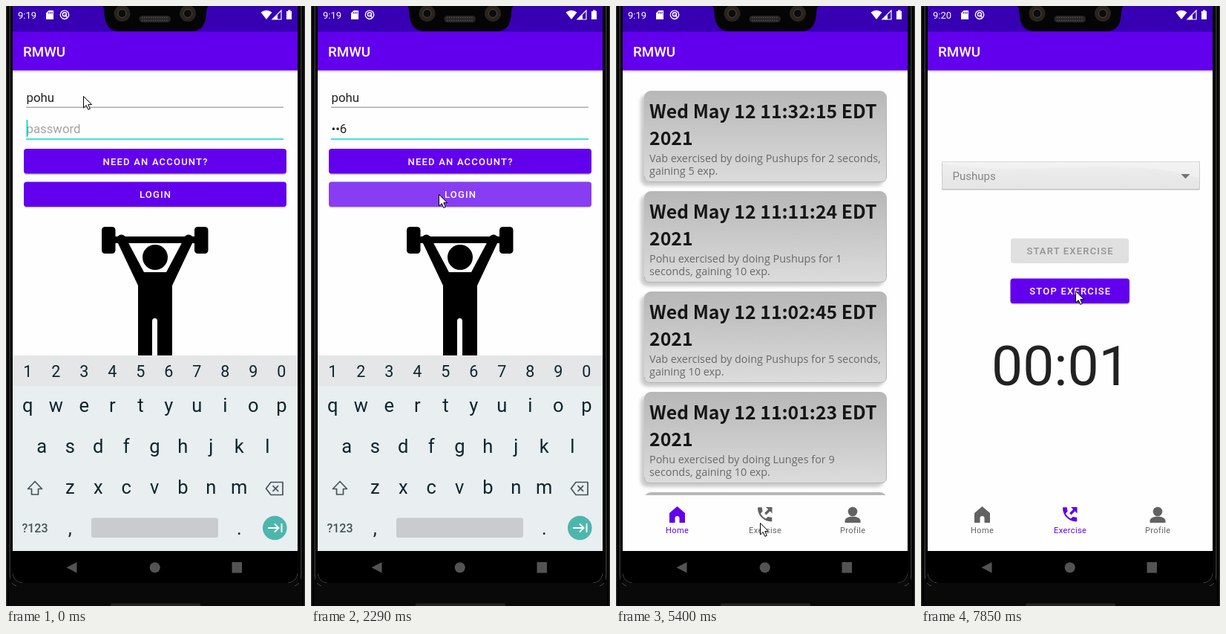
Recreate the animation shown at these times as an HTML page. Size 403x807 px, loop 8 s.

```html
<!DOCTYPE html>
<html lang="en">
<head>
<meta charset="utf-8">
<title>Workout app</title>
<style>
html, body { margin: 0; width: 100%; height: 100%; overflow: hidden; background: #000; }
svg { display: block; width: 100%; height: 100%; }
text { font-family: Roboto, sans-serif; fill: #222; }
.mid { text-anchor: middle; }
.heading { font-size: 18.8px; font-weight: 500; fill: #fff; }
.clock { font-size: 13px; fill: #fff; }
.field { font-size: 16.8px; }
.hint { fill: #a2a2a2; }
.btn rect { fill: #6200ee; }
.btn text { font-size: 13px; font-weight: 500; letter-spacing: 1.2px; fill: #fff; text-anchor: middle; }
.btn.off rect { fill: #e0e0e0; }
.btn.off text { fill: #929292; }
.keys text { fill: #0d252c; text-anchor: middle; font-size: 25.5px; }
.keys .num { font-size: 21.5px; }
.keys .sym { font-size: 16px; font-weight: 500; fill: #46545a; }
.date { font: 700 24.8px "Noto Sans CJK JP", "Noto Sans CJK SC", sans-serif; fill: #161616; }
.note { font: 14.4px "Open Sans", sans-serif; fill: #696969; }
.tab { color: #626262; fill: currentColor; }
.tab text { font-size: 11px; letter-spacing: .4px; text-anchor: middle; fill: currentColor; }
.tab.on { color: #6200ee; }
.timer { font-size: 75px; }
.pick { font-size: 15px; }

#cursor, #caret, #keyboard, #feed, #toast, .ripple { animation: 8s linear infinite; }
#cursor { animation-name: point; }
#caret { animation-name: caret; animation-timing-function: step-end; }
#keyboard { animation-name: drop; }
#feed { animation-name: enter; }
#toast { animation-name: toast; }
.ripple { transform-box: fill-box; transform-origin: center; }
#tapHome { animation-name: tapHome; }
#tapExercise { animation-name: tapExercise; }

@keyframes point {
  0% { transform: translate(104px, 121px); }
  8.75% { transform: translate(104px, 121px); animation-timing-function: steps(7, jump-both); }
  19.9%, 30.6% { transform: translate(172px, 253px); animation-timing-function: steps(2, jump-both); }
  34.2%, 36.1% { transform: translate(138px, 527px); animation-timing-function: steps(1, jump-both); }
  37.9%, 39.4% { transform: translate(105px, 714px); animation-timing-function: steps(1, jump-both); }
  41%, 44.4% { transform: translate(85px, 701px); animation-timing-function: step-end; }
  44.5% { transform: translate(83px, 700px); animation-timing-function: step-end; }
  48%, 61.1% { transform: translate(83px, 695px); animation-timing-function: steps(2, jump-both); }
  64.3% { transform: translate(140px, 691px); animation-timing-function: steps(2, jump-end); }
  67.4%, 77.75% { transform: translate(194px, 695px); animation-timing-function: steps(4, jump-both); }
  84.1%, 92.85% { transform: translate(188px, 337px); animation-timing-function: steps(3, jump-both); }
  98%, 100% { transform: translate(208px, 383px); }
}
@keyframes caret {
  0% { transform: none; }
  10.375% { transform: translateX(9.5px); }
  13.5% { transform: translateX(15.4px); }
  16.75%, 100% { transform: translateX(21.3px); }
}
@keyframes drop {
  0%, 28.7% { transform: none; }
  31%, 99.9% { transform: translateY(264px); }
  100% { transform: none; }
}
@keyframes enter {
  0%, 28.7% { transform: translateY(40px); opacity: 0; }
  32.5%, 100% { transform: none; opacity: 1; }
}
@keyframes toast {
  0%, 30.6% { opacity: 0; }
  33%, 48% { opacity: 1; }
  51.5%, 100% { opacity: 0; }
}
@keyframes tapHome {
  0%, 54.6% { transform: scale(.6); opacity: 0; }
  54.7% { transform: scale(.7); opacity: 1; }
  56.25% { transform: scale(1); opacity: 1; }
  58% { transform: scale(1.04); opacity: 1; }
  59.6%, 100% { transform: scale(1.05); opacity: 0; }
}
@keyframes tapExercise {
  0%, 72.8% { opacity: 0; }
  72.85%, 74.5% { opacity: 1; }
  77.5%, 100% { opacity: 0; }
}
</style>
</head>
<body>
<svg viewBox="0 0 403 807" preserveAspectRatio="none">
  <defs>
    <clipPath id="screen"><rect x="9" y="-12" width="384" height="788" rx="14"/></clipPath>
    <clipPath id="content"><rect x="9" y="86" width="384" height="647"/></clipPath>
    <clipPath id="list"><rect x="9" y="86" width="384" height="572"/></clipPath>
    <clipPath id="tabs"><rect x="9" y="666" width="384" height="52"/></clipPath>
    <linearGradient id="cardFill" x2="0" y2="1">
      <stop stop-color="#b7b7b7"/><stop offset="1" stop-color="#dcdcdc"/>
    </linearGradient>
    <linearGradient id="pickFill" x2="0" y2="1">
      <stop stop-color="#e2e2e2"/><stop offset="1" stop-color="#cfcfcf"/>
    </linearGradient>
    <linearGradient id="shade" x2="0" y2="1">
      <stop stop-color="#000" stop-opacity=".25"/><stop offset="1" stop-color="#000" stop-opacity="0"/>
    </linearGradient>
    <filter id="soft"><feGaussianBlur stdDeviation="2"/></filter>
    <path id="house" d="M82.5 673 72 682v13h7.5v-6a3 3 0 0 1 6 0v6H93v-13z"/>
    <g id="phone">
      <path transform="translate(187.8 671) scale(1.07)" d="M6.6 10.8c1.4 2.8 3.8 5.1 6.6 6.6l2.2-2.2c.3-.3.7-.4 1-.2 1.100.4 2.300.6 3.600.6.6 0 1 .4 1 1V20c0 .6-.4 1-1 1-9.400 0-17-7.600-17-17 0-.6.4-1 1-1h3.500c.6 0 1 .4 1 1 0 1.200.2 2.400.6 3.600.1.300 0 .7-.3 1z"/>
      <path d="M202 674h8.5v8.5l-3-3-5 5-2.4-2.4 5-5z"/>
    </g>
    <g id="person">
      <circle cx="319" cy="680" r="6.3"/>
      <path d="M308.5 695v-2.5c0-4 5-5.8 10.5-5.8s10.5 1.8 10.5 5.8v2.5z"/>
    </g>
  </defs>

  <!-- handset -->
  <rect width="403" height="807" fill="#090909"/>
  <g fill="none">
    <path d="M.7 0V807M402.3 0V807" stroke="#2b2b2b" stroke-width="1.4"/>
    <path d="M2.8 0V807M400.2 0V807" stroke="#000" stroke-width="2"/>
    <path d="M5.2 0V765Q5.5 778 14 780M397.8 0V765Q397.5 778 389 780" stroke="#4a4a4a"/>
    <path d="M7.5 0V776M395.5 0V776" stroke="#000" stroke-width="3"/>
  </g>
  <rect x="141" y="803.5" width="121" height="6" rx="2" fill="#252525"/>

  <g clip-path="url(#screen)">
    <rect x="9" y="0" width="384" height="776" fill="#fefefe"/>

    <g clip-path="url(#content)">
      <g data-on="0-2620">
        <text class="field" x="27.5" y="129">pohu</text>
        <path d="M27 136.2H374" stroke="#858585"/>
        <text class="field hint" x="27.5" y="171" data-on="0-830">password</text>
        <text class="field" x="27.5" y="171" data-on="830-1080">6</text>
        <text class="field" x="27.5" y="171" data-on="1080-1340">•6</text>
        <text class="field" x="27.5" y="171" data-on="1340-2620">••6</text>
        <path d="M27 179H374" stroke="#03dac5" stroke-width="1.7"/>
        <g data-on="0-430 830-2000"><rect id="caret" x="27.5" y="153" width="1.8" height="23" fill="#03dac5"/></g>
        <g id="loginButtons"></g>
        <rect x="24" y="236.5" width="354" height="33.5" rx="4" fill="#fff" opacity=".24" data-on="2150-2450"/>

        <rect x="129" y="297" width="18.5" height="36" rx="4.5"/>
        <rect x="254" y="297" width="18.5" height="36" rx="4.5"/>
        <path d="M147 310H254V319H147z"/>
        <circle cx="155.5" cy="314" r="6.5"/><circle cx="246" cy="314" r="6.5"/>
        <circle cx="201" cy="338" r="17"/>
        <path d="M149.5 316 162 313 186 358H216L240 313 252.5 316 224 376V520H204V424Q204 420 200.5 420T197 424V520H178V376z"/>

        <g id="keyboard">
          <rect x="9" y="470" width="384" height="263" fill="#e9eef1"/>
          <rect x="9" y="470" width="384" height="41" fill="#e4e6e8"/>
          <g class="keys" id="keys"></g>
          <rect x="115" y="688.5" width="171" height="26.5" rx="3" fill="#c8ccce"/>
          <g fill="none" stroke="#46545a" stroke-width="1.7" stroke-linejoin="round">
            <path d="M39 639.5 48.5 649.5H43.5V657H34.5V649.5H29.5z"/>
            <path d="M357 640.5H373V657.5H357L350.5 649z"/>
            <path d="M359.5 645.2l7.6 7.6m0-7.6-7.6 7.6"/>
          </g>
          <circle cx="362.3" cy="702" r="16.3" fill="#4db6ac"/>
          <path d="M353 702H367M362 696.5 367.5 702 362 707.5M371.5 696V708" fill="none" stroke="#fff" stroke-width="2"/>
        </g>
      </g>

      <g data-on="2300-5830"><g id="feed">
        <rect x="9" y="86" width="384" height="690" fill="#fefefe"/>
        <g clip-path="url(#list)"><g id="cards" data-on="0-4480 4650-8000"></g></g>
      </g></g>

      <g data-on="5830-8000">
        <g id="ready" data-on="0-6880"></g>
        <g id="running" data-on="6880-8000"></g>
        <rect x="121" y="312.5" width="159" height="33.5" rx="4" fill="#fff" opacity=".24" data-on="6730-6880"/>
        <text class="timer" x="95" y="510" data-on="0-7830">00:00</text>
        <text class="timer" x="95" y="510" data-on="7830-8000">00:01</text>
      </g>

      <g data-on="2450-8000">
        <g clip-path="url(#tabs)">
          <circle class="ripple" id="tapHome" cx="82.5" cy="692" r="55.5" fill="#e4d6fa"/>
          <circle class="ripple" id="tapExercise" cx="200" cy="692" r="61" fill="#d4d4d4"/>
        </g>
        <g class="tab on" data-on="0-5830"><use href="#house"/><text x="82.7" y="709">Home</text></g>
        <g class="tab" data-on="5830-8000"><use href="#house"/><text x="82.7" y="709">Home</text></g>
        <g class="tab" data-on="0-5830"><use href="#phone"/><text x="201.2" y="709">Exercise</text></g>
        <g class="tab on" data-on="5830-8000"><use href="#phone"/><text x="201.2" y="709">Exercise</text></g>
        <g class="tab"><use href="#person"/><text x="319.2" y="709">Profile</text></g>
        <g id="toast">
          <rect x="152" y="665" width="97" height="46" rx="23" fill="#f0f0f0" fill-opacity=".93"/>
          <text class="mid" x="200.5" y="693" font-size="13">Success!</text>
        </g>
      </g>
    </g>

    <!-- status strip, app header, system buttons -->
    <rect x="9" y="86" width="384" height="4" fill="url(#shade)"/>
    <rect x="9" y="0" width="384" height="35" fill="#3700b3"/>
    <rect x="9" y="34.5" width="384" height="52" fill="#6200ee"/>
    <text class="heading" x="23" y="68">RMWU</text>
    <text class="clock" x="16" y="17" data-on="0-6350">9:19</text>
    <text class="clock" x="16" y="17" data-on="6350-8000">9:20</text>
    <g fill="#fff">
      <path d="M57.5 6H64V18H54V9.5z"/>
      <path d="M57.7 8v2.5M60 8v2.5M62.2 8v2.5" stroke="#3700b3"/>
      <path d="M343.5 8.5Q351 3 358.5 8.5L351 18z"/>
      <path d="M371 6V18H359z" fill="none" stroke="#fff" stroke-width="1.2"/>
      <path d="M366 11.5V18H359.5z"/>
      <path d="M380 5.5h3.5V7H385V18H378V7h2z"/>
    </g>
    <g fill="none" stroke="#fff" stroke-width="1.4">
      <circle cx="79" cy="11.8" r="5.7"/><circle cx="79" cy="11.3" r="2.6"/><path d="M79 11.5 83 16"/>
    </g>
    <rect x="9" y="733" width="384" height="43" fill="#000"/>
    <g fill="#535353">
      <path d="M95.5 748V762.5L81.5 755.2z"/><circle cx="200.7" cy="755.3" r="7"/><rect x="304.5" y="748" width="13.5" height="14.5"/>
    </g>
  </g>

  <!-- notch -->
  <path d="M130 0Q132 2 132.5 9C133 24 139 34 153 34H250C264 34 269.5 24 270 9Q270.5 2 273 0z" fill="#050505"/>
  <g fill="#29231f"><circle cx="156.5" cy="10" r="11"/><circle cx="245" cy="10" r="11"/></g>
  <g fill="#0c0b0a" stroke="#5a534c" stroke-width=".8"><circle cx="156.5" cy="10" r="5.5"/><circle cx="245" cy="10" r="5.5"/></g>
  <rect x="179.5" y="13" width="42.5" height="9" rx="4.5" fill="#252525"/>
  <path d="M183 15.5H219M183 19.5H219" stroke="#505050" stroke-width="1.5" stroke-dasharray="1.5"/>

  <path id="cursor" d="M.5.5V16L4.2 12.6 6.8 18.4 9.3 17.3 6.8 11.6H11.6z" fill="#fff" stroke="#000" stroke-linejoin="round"/>
</svg>

<script>
const LOOP = 8000;
const fill = (id, html) => { document.getElementById(id).innerHTML = html; };

const button = (x, y, w, label, on = true) => `<g class="btn${on ? '' : ' off'}">
  ${on ? `<rect x="${x}" y="${y + 1.5}" width="${w}" height="33.5" rx="4" style="fill:#0003"/>` : ''}
  <rect x="${x}" y="${y}" width="${w}" height="33.5" rx="4"/>
  <text x="${x + w / 2 + 0.6}" y="${y + 21.5}">${label}</text></g>`;

fill('loginButtons', button(24, 192, 354, 'NEED AN ACCOUNT?') + button(24, 236.5, 354, 'LOGIN'));

const keyRow = (chars, x, y, cls = '') => [...chars]
  .map((c, i) => `<text class="${cls}" x="${x + i * 38}" y="${y}">${c}</text>`).join('');
fill('keys', keyRow('1234567890', 29.3, 499, 'num') + keyRow('qwertyuiop', 29.3, 546)
  + keyRow('asdfghjkl', 48.3, 601) + keyRow('zxcvbnm', 86.3, 656)
  + keyRow(',', 86.3, 711) + keyRow('.', 314.3, 711)
  + '<text class="sym" x="39" y="708">?123</text>');

const entries = [
  ['11:32:15', 'Vab exercised by doing Pushups for 2 seconds,', 'gaining 5 exp.'],
  ['11:11:24', 'Pohu exercised by doing Pushups for 1', 'seconds, gaining 10 exp.'],
  ['11:02:45', 'Vab exercised by doing Pushups for 5 seconds,', 'gaining 10 exp.'],
  ['11:01:23', 'Pohu exercised by doing Lunges for 9', 'seconds, gaining 10 exp.'],
  ['', '', ''],
];
fill('cards', entries.map(([time, first, second], i) => `<g transform="translate(0 ${i * 135})">
  <rect x="33" y="119" width="328" height="123" rx="9" fill="#000" opacity=".2" filter="url(#soft)"/>
  <rect x="38" y="114" width="327" height="123" rx="9" fill="url(#cardFill)"/>
  <path d="M38.5 229Q38.5 236.5 46 236.5H357Q364.5 236.5 364.5 229V130" fill="none" stroke="#b4b4b4"/>
  <text class="date" x="45" y="151">${time && `Wed May 12 ${time} EDT`}</text>
  <text class="date" x="45" y="187">${time && 2021}</text>
  <text class="note" x="45" y="210">${first}</text>
  <text class="note" x="45" y="227">${second}</text></g>`).join(''));

const exercise = (ready) => `<g opacity="${ready ? 1 : 0.55}">
  <rect x="28" y="209" width="348" height="38.5" rx="1.5" fill="#8c8c8c"/>
  <rect x="28.7" y="209.5" width="346.6" height="36.5" rx="1" fill="url(#pickFill)"/>
  <path d="M29 210H375V232Q320 212 200 217T29 212z" fill="#fff" opacity=".25"/>
  <text class="pick" x="42.5" y="234">Pushups</text>
  <path d="M350.5 226H362.5L356.5 232.3z"/></g>`
  + button(121, 312.5, 159, 'START EXERCISE', ready)
  + button(120.5, 366.5, 160.5, 'STOP EXERCISE', !ready);
fill('ready', exercise(true));
fill('running', exercise(false));

// data-on lists the spans in ms during which an element shows
for (const el of document.querySelectorAll('[data-on]')) {
  const spans = el.dataset.on.split(' ').map(s => s.split('-').map(Number));
  const shown = getComputedStyle(el).opacity;
  const frames = spans[0][0] ? [{ offset: 0, opacity: 0 }] : [];
  for (const [from, to] of spans) {
    frames.push({ offset: from / LOOP, opacity: shown });
    frames.push({ offset: to / LOOP, opacity: to < LOOP ? 0 : shown });
  }
  if (frames.at(-1).offset < 1) frames.push({ offset: 1, opacity: 0 });
  el.animate(frames.map(f => ({ ...f, easing: 'step-end' })), { duration: LOOP, iterations: Infinity });
}
</script>
</body>
</html>
```
